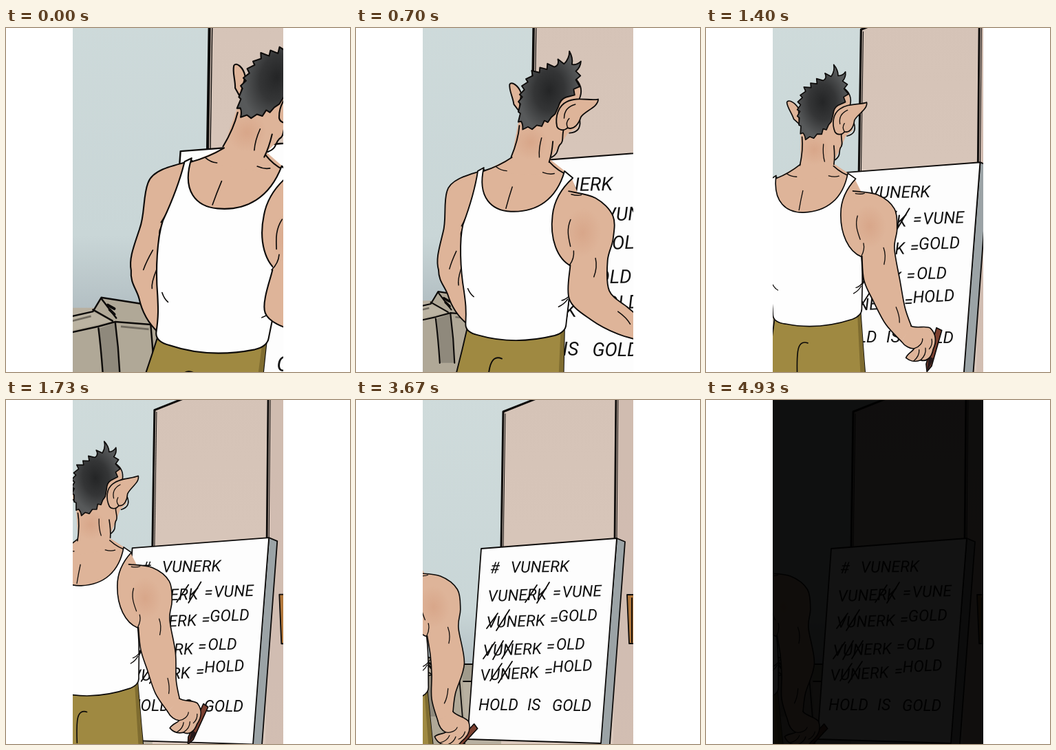
An HTML page for the animation above (4.96 s loop, 500 by 500 pixels).

```html
<!DOCTYPE html>
<html lang="en">
<head>
<meta charset="utf-8">
<title>Whiteboard</title>
<style>
  html, body { margin: 0; width: 100%; height: 100%; overflow: hidden; background: #fff; }
  svg { display: block; width: 100vw; height: 100vh; }
  .ink { fill: none; stroke: #0d0b0a; stroke-width: 1.8; stroke-linecap: round; stroke-linejoin: round; }
  .thin { stroke-width: 1.4; }
  .skin { fill: #deb499; }
  .words { font: italic 400 23px Roboto, sans-serif; fill: #111; }
</style>
</head>
<body>
<svg viewBox="0 0 500 500">
  <defs>
    <clipPath id="crop"><rect x="97" width="306" height="500"/></clipPath>
    <linearGradient id="wall" x2="0" y2="1">
      <stop offset="0" stop-color="#cfdbdb"/>
      <stop offset=".8" stop-color="#c9d6d7"/>
      <stop offset="1" stop-color="#b3bfc3"/>
    </linearGradient>
    <linearGradient id="door" x2="0" y2="1">
      <stop offset="0" stop-color="#d5c3b7"/>
      <stop offset="1" stop-color="#dac8bc"/>
    </linearGradient>
    <radialGradient id="hair">
      <stop offset="0" stop-color="#242526"/>
      <stop offset=".5" stop-color="#343536"/>
      <stop offset="1" stop-color="#57595a"/>
    </radialGradient>
    <radialGradient id="blush">
      <stop offset="0" stop-color="#cf9273" stop-opacity=".4"/>
      <stop offset="1" stop-color="#cf9273" stop-opacity="0"/>
    </radialGradient>
  </defs>

  <g clip-path="url(#crop)">
    <g id="room">
      <rect x="40" y="-10" width="400" height="395" fill="url(#wall)"/>
      <rect x="40" y="384" width="400" height="130" fill="#b8b0a0"/>
      <rect x="110" y="384" width="80" height="25" fill="#a09b8c"/>
      <path class="ink" d="M110 384H190M110 409H190"/>

      <path fill="#b0a897" d="M40 397L66 393 87 389 96 373 142 380 155 402 160 510H40Z"/>
      <path fill="#bbb3a2" d="M40 398L88 389 109 398 40 414Z"/>
      <path fill="#8f897c" d="M95 406L112 400 117 460 99 460Z"/>
      <path class="ink" d="M40 396L66 393 88 388 97 373 142 380M88 386L109 398M40 416L94 404 112 399 150 402M97 374L113 395M94 406Q97 430 99 460M112 400Q116 430 117 460M150 402L158 500"/>
      <path class="ink" style="stroke-width:3" d="M104 381l7 4m-5 1l5 5"/>
      <path fill="none" stroke="#6f695e" stroke-width="2" d="M66 398L86 393M118 404L148 407"/>

      <path fill="url(#door)" d="M214 17L258 0V-10H440V510H211V214Z"/>
      <path fill="#cdb8ac" d="M378 -10H440V510H374Z" opacity=".6"/>
      <path class="ink" style="stroke-width:3" d="M262 -2L214 17 211 216"/>
      <path class="ink" style="stroke-width:1" d="M217 20L214 214"/>
      <path class="ink" style="stroke-width:2.8" d="M378 -10L376 206"/>
      <path class="ink" style="stroke-width:1" d="M381 -10L379 203"/>
      <path class="ink" style="fill:#b2783c" d="M394 283H412V354H397Z"/>
      <path class="ink" d="M401 288V352"/>

      <path class="ink" style="fill:#9ba3a6" d="M379 201L391 206 368 512H354Z"/>
      <path class="ink" style="fill:#fdfdfd" d="M182 216L379 201 356 499 162 493Z"/>

      <g id="notes" class="words"></g>
      <path class="ink" d="M246 294L263 269M263 295L281 265M190 332L206 310M204 335L223 305M185 376L202 352M199 377L214 350M212 376L228 350M195 408L212 383M207 411L227 380"/>
    </g>

    <g id="man">
      <path class="ink" style="fill:#9f8941" d="M134 428Q128 465 121 500L112 600H276L271 500 268 426Z"/>
      <path fill="#7f6c30" d="M263 432L268 428 271 500 275 600 266 600Z"/>
      <path class="ink" d="M184 471Q171 466 168 484Q166 497 166 520"/>

      <path class="ink" style="fill:#deb499" d="M144 211C118 220 97 227 94 243C90 260 96 282 92 300C88 322 84 338 89 352C90 368 99 374 104 386C110 402 121 416 133 425L132 385 120 345 117 300Z"/>
      <path class="ink thin" d="M112 325Q106 340 104 350M120 349Q116 365 118 372M128 262Q121 282 117 290"/>

      <path class="skin" d="M140 215L181 192H233L264 214 276 240 273 338 240 330 140 300Z"/>
      <g id="head">
        <path class="skin" d="M186 145L181 193 175 215H240L232 196 236 187 246 172 256 154 268 146V86L215 90Z"/>
        <ellipse cx="205" cy="170" rx="24" ry="24" fill="url(#blush)"/>
        <path class="ink" d="M188 148Q188 168 180 192M262 80Q273 91 268 106M250 148C247 158 252 166 246 171C242 177 246 183 236 189M271 136Q274 152 258 154M236 167Q236 184 233 196"/>
        <path class="ink thin" d="M220 163Q217 178 219 190"/>
        <path class="ink" style="fill:#deb499" d="M187 103C182 92 172 87 170 92C170 101 176 109 178 119L186 128Z"/>
        <path class="ink" style="fill:url(#hair)" d="M193 153Q193 146 190 142L186 143 188 131 185 129 187 118 184 115 189 108 185 105 191 98 187 93 195 87 192 83 201 78 199 71 210 73 210 66 220 68 220 60 230 64Q237 61 234 53L243 59Q250 51 249 41Q255 50 254 59Q261 60 266 54Q266 63 260 68L267 74 261 80 267 89 259 93 261 101 249 105Q242 108 240 118L236 129 231 134 227 141 222 139 219 147 212 146 206 152 200 149Z"/>
        <path class="ink" style="fill:#deb499" d="M240 146C236 132 240 117 251 111C264 103 283 108 294 105C295 116 277 122 272 131C270 140 264 150 255 147C249 153 242 150 240 146Z"/>
        <path class="ink thin" d="M249 134Q248 119 263 114M255 147Q251 140 256 134"/>
      </g>
      <path class="ink" d="M181 192Q164 205 142 213M233 196Q246 209 262 214"/>
      <path class="ink thin" d="M160 206Q167 211 175 211M225 211Q234 214 241 212"/>

      <path class="ink" style="fill:#fefefe" d="M143 208C136 250 158 267 184 267C220 267 246 248 255 208L267 217C256 228 243 246 242 270C240 302 252 330 272 339C274 370 271 395 270 420Q270 431 255 436Q200 452 150 440Q131 437 131 425C131 405 129 395 126 380C119 350 115 310 119 288C127 262 133 235 135 213Z"/>
      <path class="ink thin" d="M184 233Q180 248 177 263M131 376Q135 384 140 387M276 376Q268 386 262 387M270 385Q266 392 258 396"/>

      <g id="limb">
        <path id="arm" class="skin"/>
        <ellipse cx="286" cy="292" rx="26" ry="34" fill="url(#blush)"/>
        <path id="armLine" class="ink"/>
        <path class="ink thin" d="M268 275C263 290 268 302 271 312M272 338Q278 328 276 318M307 352Q311 338 307 326M266 240Q275 242 280 240"/>
        <g id="hand">
          <path class="ink" style="fill:#7c4030" d="M403 428L412 430 410 488 405 498 401 487Z"/>
          <path fill="#26191a" d="M402 474L411 476 405 498Z"/>
          <path class="ink" style="fill:#deb499" d="M364 435C374 437 386 428 394 431C404 437 409 448 406 462C407 476 400 484 391 483C383 489 374 488 368 485C369 477 376 473 377 468C371 470 362 468 355 462"/>
          <path class="ink thin" d="M377 468C384 464 388 456 386 450M391 483Q398 473 394 463M381 487Q388 477 385 468M400 447Q404 455 400 463"/>
          <path class="ink thin" d="M334 412Q343 424 345 434"/>
        </g>
      </g>
    </g>
    <rect id="dark" x="97" width="306" height="500" opacity="0"/>
  </g>
</svg>

<script>
const LOOP = 4960;
const $ = id => document.getElementById(id);

// x, baseline, tilt, text
const notes = [
  [195, 252, -1, '#'], [225, 251, -1, 'VUNERK'],
  [192, 293, -2, 'VUNERK'], [286, 288, -2, '='], [300, 287, -2, 'VUNE'],
  [190, 331, -2, 'VUNERK'], [282, 327, -2, '='], [294, 322, -2, 'GOLD'],
  [185, 372, -2, 'VUNERK'], [277, 366, -2, '='], [291, 363, -1, 'OLD'],
  [181, 408, -3, 'VUNERK'], [274, 402, -3, '='], [286, 396, -3, 'HOLD'],
  [178, 451, 0, 'HOLD'], [249, 451, 0, 'IS'], [285, 452, 0, 'GOLD'],
];
for (const [x, y, tilt, word] of notes) {
  const el = document.createElementNS('http://www.w3.org/2000/svg', 'text');
  el.setAttribute('transform', `translate(${x} ${y}) rotate(${tilt})`);
  el.textContent = word;
  $('notes').append(el);
}

const times = [0, 400, 1000, 1730, 2400, 3070];
const tracks = {
  zoom: [1.355, 1.255, 1.134, 1.008, 1, 1],
  x: [303, 262, 180, 106, 38, 16],
  y: [262, 266, 267, 270, 289, 284],
  size: [1.17, 1.1, 1, .9, .9, .9],
  turn: [.087, .078, 0, -.044, -.044, -.06],
  lean: [.06, .045, 0, 0, 0, 0],
  head: [5, 2, 0, -7, -8, -10],
  swing: [7, 4, 0, 0, 0, 0],
  elbow: [-50, -42, 0, 25, 37, 44],
};

// Smooth monotone interpolation through the keys of a track
function sample(v, t) {
  const last = times.length - 1;
  if (t >= times[last]) return v[last];
  const secant = i => (v[i + 1] - v[i]) / (times[i + 1] - times[i]);
  const slope = i => {
    if (i === 0) return secant(0);
    if (i === last) return 0;
    const a = secant(i - 1), b = secant(i);
    return a * b > 0 ? 2 * a * b / (a + b) : 0;
  };
  const i = times.findIndex((_, n) => t < times[n + 1]);
  const h = times[i + 1] - times[i], u = (t - times[i]) / h, w = 1 - u;
  return v[i] * (1 + 2 * u) * w * w + v[i + 1] * u * u * (3 - 2 * u)
    + h * (slope(i) * u * w * w - slope(i + 1) * u * u * w);
}

// x, y, share of the elbow's bend
const elbowAt = [302, 378];
const outer = [[262, 236, 0], [300, 243, 0], [326, 266, 0], [329, 298, 0],
  [324, 328, 0], [331, 375, .5], [348, 410, 1], [365, 436, 1]];
const inner = [[355, 462, 1], [325, 442, 1], [297, 412, .9], [275, 380, .5], [273, 338, 0]];

function bend([x, y, share], deg) {
  const a = deg * share * Math.PI / 180, c = Math.cos(a), s = Math.sin(a);
  const dx = x - elbowAt[0], dy = y - elbowAt[1];
  return [elbowAt[0] + dx * c - dy * s, elbowAt[1] + dx * s + dy * c];
}

function curve(p) {
  let d = '';
  for (let i = 0; i < p.length - 1; i++) {
    const a = p[i - 1] || p[i], b = p[i], c = p[i + 1], e = p[i + 2] || c;
    d += `C${b[0] + (c[0] - a[0]) / 6} ${b[1] + (c[1] - a[1]) / 6} `
      + `${c[0] - (e[0] - b[0]) / 6} ${c[1] - (e[1] - b[1]) / 6} ${c[0]} ${c[1]}`;
  }
  return d;
}

function draw(t) {
  const k = {};
  for (const name in tracks) k[name] = sample(tracks[name], t);

  $('room').setAttribute('transform',
    `translate(-20 320) scale(${k.zoom}) translate(20 -320)`);
  $('man').setAttribute('transform',
    `matrix(${k.size} ${k.size * k.turn} ${-k.size * (k.turn + k.lean)} ${k.size} ${k.x} ${k.y}) translate(-180 -267)`);
  $('head').setAttribute('transform', `rotate(${k.head} 200 185)`);
  $('limb').setAttribute('transform', `rotate(${k.swing} 280 250)`);
  $('hand').setAttribute('transform', `rotate(${k.elbow} ${elbowAt})`);

  const up = outer.map(p => bend(p, k.elbow)), down = inner.map(p => bend(p, k.elbow));
  $('arm').setAttribute('d', `M${up[0]}${curve(up)}L${down[0]}${curve(down)}Z`);
  $('armLine').setAttribute('d', `M${up[0]}${curve(up)}M${down[0]}${curve(down)}`);

  $('dark').setAttribute('opacity', Math.max(0, (t - 3840) / 1180));
}

const start = performance.now();
function tick(now) {
  draw(Math.max(0, now - start) % LOOP);
  requestAnimationFrame(tick);
}
draw(0);
requestAnimationFrame(tick);
</script>
</body>
</html>
```
